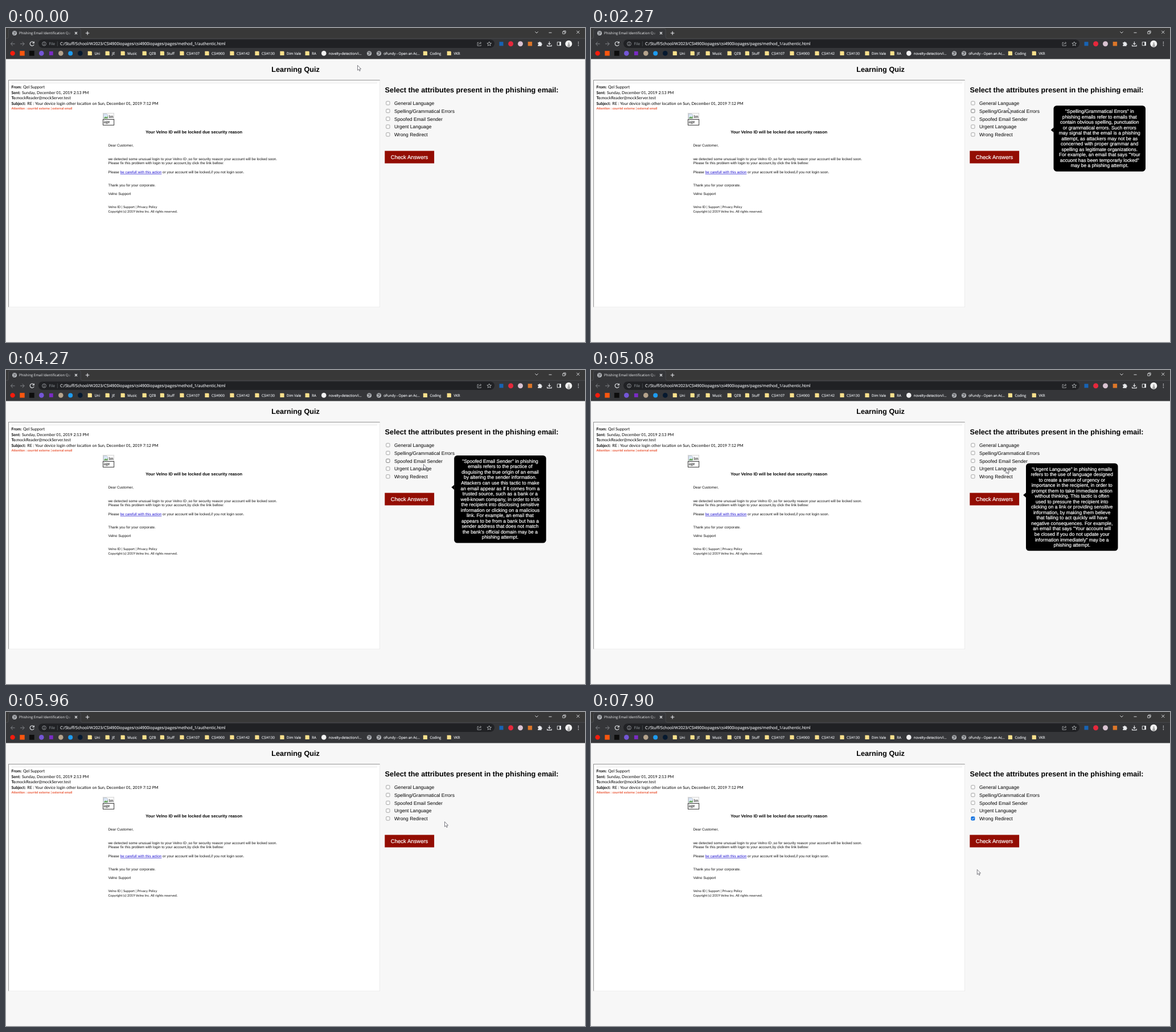
These frames come from a looping animation (1017 px wide and 551 px high, 7990 ms). An HTML page:

```html
<!DOCTYPE html>
<html lang="en">
<head>
<meta charset="utf-8">
<title>Learning Quiz</title>
<style>
html, body { margin: 0; width: 100%; height: 100%; overflow: hidden; background: #f7f7f7; }
svg { display: block; width: 1017px; height: 551px; }
text { white-space: pre; text-rendering: geometricPrecision; }
/* light text on dark reads slightly heavier */
text[fill="#fff"] { stroke: #fff; stroke-width: .2px; }
text[fill="#e8eaed"] { stroke: #e8eaed; stroke-width: .15px; }
.page { font-family: "Liberation Sans", Arial, sans-serif; }
.mail { font-family: Lato, sans-serif; }
.ui { font-family: "Open Sans", "Noto Sans", sans-serif; }
.b { font-weight: 700; }
</style>
</head>
<body>
<svg id="stage" viewBox="0 0 1017 551" xmlns="http://www.w3.org/2000/svg">
  <defs>
    <linearGradient id="fade" gradientUnits="userSpaceOnUse" x1="106" x2="116" y1="0" y2="0">
      <stop offset="0" stop-color="#f1f2f4"/><stop offset="1" stop-color="#f1f2f4" stop-opacity="0"/>
    </linearGradient>
    <g id="globe">
      <circle r="4" fill="#c3c6ca"/>
      <path d="M-3 -1.6Q-1 -2.6 0 -1T2 1.4M-2.6 1.8Q-.6 .4 .3 2.6M.8 -3Q1 -1.4 2.8 -1.2" fill="none" stroke="#4a4b4e" stroke-width="1.1"/>
    </g>
    <path id="folder" d="M-3.6 -3.6H2.6L3.6 -2.6V3.7H-3.6Z" fill="#fbe08c"/>
  </defs>
  <g id="chrome">
    <rect width="1017" height="19" fill="#383838"/>
    <rect y="18" width="1017" height="36.5" fill="#353639"/>
    <path d="M0 18.3H2Q4.5 18.3 4.5 15.5V4Q4.5 .8 7.7 .8H128Q131.2 .8 131.2 4V15.5Q131.2 18.3 134 18.3H1017" fill="#353639" stroke="#57585b" stroke-width=".6"/>
    <rect x="57" y="20.2" width="801" height="14.8" rx="7.4" fill="#202124"/>
    <g fill="none" stroke="#e8eaed" stroke-width=".9">
      <path d="M121 7l4 4M125 7l-4 4M139.8 9h6.6M143.1 5.7v6.6" stroke-width="1.1"/>
      <path d="M929.4 6.4l2.6 2.6 2.6 -2.6M953.5 8.2h5M1002.3 4.8l5 5M1007.3 4.8l-5 5"/>
      <path d="M977.8 6.3h3.9v3.9h-3.9zM979.2 6.2v-1.2h3.9v3.9h-1.3" stroke-width=".8"/>
      <path d="M15.6 27.8H8.6M11.8 24.4L8.4 27.8l3.4 3.4M25 27.8h7M28.8 24.4l3.4 3.4-3.4 3.4" stroke="#8b8d91"/>
      <path d="M48.5 25.3A3.6 3.6 0 1 0 49.2 28.8M49.3 23.8v2.7h-2.8" stroke-width="1.1"/>
      <path d="M67 27.3v2.4M67 25.4v.9" stroke="#bdc1c6"/>
      <circle cx="67" cy="27.7" r="3.4" stroke="#bdc1c6" stroke-width=".7"/>
      <path d="M90.3 23.5v8.5" stroke="#5f6368" stroke-width=".6"/>
      <path d="M830.3 25.4h-2.2v5.8h6.2v-1.8M830 29.2q.4 -3 4 -3M832.8 24.3l2 1.9-2 1.9" stroke="#c4c7cb" stroke-width=".7"/>
      <path d="M848.7 24l1.1 2.5 2.7.2-2.1 1.8.7 2.6-2.4-1.4-2.4 1.4.7-2.6-2.1-1.8 2.7-.2z" stroke="#d5d8dc" stroke-width=".7"/>
      <path d="M954.4 23.8v5M952.2 26.8l2.2 2.2 2.2-2.2M950.6 29.4v2.2h7.6v-2.2" stroke-width="1.1"/>
      <path d="M968.3 24.7h6.2v6h-6.2z"/>
    </g>
    <path d="M972.2 24.5h2.6v6.4h-2.6z" fill="#e8eaed"/>
    <path d="M934.2 25.2h2.1a1.2 1.2 0 0 1 2.4 0h1.9v2.1a1.2 1.2 0 0 1 0 2.4v2h-6.4v-1.9a1.2 1.2 0 0 0 0-2.4z" fill="#e8eaed"/>
    <g fill="#e8eaed"><circle cx="1005.4" cy="24.9" r=".8"/><circle cx="1005.4" cy="27.8" r=".8"/><circle cx="1005.4" cy="30.7" r=".8"/></g>
    <circle cx="988.3" cy="27.7" r="6" fill="#f4f4f4"/>
    <path d="M986.4 33.2q-.5 -4 1.3 -5.2q-1 -2 .5 -3q2 .4 1.3 3q2 1.6 1 5.2z" fill="#a9a9a9"/>
    <use href="#globe" x="15" y="9"/>
  </g>
  <g id="sheet">
    <rect x="4" y="91" width="653" height="399" fill="#ececec"/>
    <path d="M4 490V91H657L656 92.2H5.2V489z" fill="#989898"/>
    <rect x="5.2" y="92.2" width="650.8" height="397" fill="#fff"/>
    <path d="M9.5 96.4H652" stroke="#dcdcdc" stroke-width=".7"/>
    <rect x="170.4" y="149.4" width="19.3" height="11" fill="#f8f8f8" stroke="#c4c4c4" stroke-width=".6"/>
    <path d="M171.3 150.7h5.5l2 2v6h-7.5z" fill="#dbe7f7" stroke="#9aa3ad" stroke-width=".6"/>
    <path d="M171.6 158.4l3-3.2 1.7 1.6 2.2-2v3.6z" fill="#64a353"/>
    <rect x="170.4" y="160.4" width="19.3" height="10" fill="#fff" stroke="#222" stroke-width=".9"/>
    <rect x="665.3" y="215.6" width="86.8" height="21.9" fill="#930d03"/>
  </g>
  <g id="words"></g>
  <g id="rows"></g>
  <g id="tips"></g>
  <path id="cursor" d="M0 0V8.7L2 6.9 3.4 10 4.8 9.4 3.5 6.4H6.1Z" fill="#fff" stroke="#3a3a44" stroke-width=".65"/>
</svg>
<script>
const NS = "http://www.w3.org/2000/svg";
const $ = id => document.getElementById(id);

function add(parent, tag, attrs, content) {
  const el = document.createElementNS(NS, tag);
  for (const key in attrs) el.setAttribute(key, attrs[key]);
  if (content !== undefined) el.textContent = content;
  parent.appendChild(el);
  return el;
}

const words = $("words");
const say = (cls, size, x, y, content, fill = "#000", parent = words) =>
  add(parent, "text", { class: cls, "font-size": size, x, y, fill }, content);

// Browser bar
const LIGHT = "#e8eaed", bar = $("chrome");
say("ui", 6.1, 23, 11.2, "Phishing Email Identification Qu", "url(#fade)");
say("ui", 6.7, 75.5, 30.2, "File", "#9aa0a6");
say("ui", 7.08, 95, 30.2, "C:/Stuff/School/W2023/CSI4900iopages/csi4900iopages/pages/method_1/authentic.html", LIGHT);

const dot = (cx, cy, r, fill) => add(bar, "circle", { cx, cy, r, fill });
const square = (cx, cy, s, fill) => add(bar, "rect", { x: cx - s / 2, y: cy - s / 2, width: s, height: s, fill });
dot(11.6, 44.4, 4.2, "#f61c0d");
square(28.5, 44.4, 8.4, "#f9560f");
square(45.3, 44.4, 8.8, "#0d0d0d");
dot(62.3, 44.4, 4.3, "#7456d6");
square(79.3, 44.4, 6.8, "#7a2bc4");
dot(96.3, 44.4, 4.3, "#b5a38c");
dot(113.2, 44.4, 4, "#1d9bf0");
dot(130.3, 44.4, 4.3, "#06192f");
dot(558.3, 44.4, 4.3, "#f2f2f2");
square(870, 27.8, 7, "#1763b4");
dot(886.6, 27.8, 4.5, "#e5283c");
dot(903.5, 27.8, 4.5, "#d9c3d2");
square(920.4, 27.8, 7.4, "#dc7629");

const folders = [
  [147.3, "Uni"], [178.2, "JE"], [205.2, "Music"], [243.2, "QZB"], [274.4, "Stuff"],
  [309, "CSI4107"], [353, "CSI4900"], [397, "CSI4142"], [441, "CSI4130"],
  [485, "Dim Vale"], [529.2, "RA"], [736.4, "Coding"], [778.3, "VKR"]
];
for (const [x, name] of folders) {
  add(bar, "use", { href: "#folder", x, y: 44.4 });
  say("ui", 6.1, x + 8.1, 46.7, name, LIGHT);
}
for (const x of [638, 655]) add(bar, "use", { href: "#globe", x, y: 44.4 });
say("ui", 6.1, 566.8, 46.7, "novelty-detection/i...", LIGHT);
say("ui", 6.1, 663.2, 46.7, "oFundy - Open an Ac...", LIGHT);

// Page headings
say("page b", 12.71, 508.6, 76.8, "Learning Quiz").setAttribute("text-anchor", "middle");
say("page b", 12.71, 665.6, 113, "Select the attributes present in the phishing email:");
say("page", 9.534, 675.8, 229.6, "Check Answers", "#fff");

// Email
const headers = [
  ["From:", 30, "Qel Support"],
  ["Sent:", 28, "Sunday, December 01, 2019 2:13 PM"],
  ["To:", 18.4, "mockReader@mockServer.test"],
  ["Subject:", 37.2, "RE : Your device login other location on Sun, December 01, 2019 7:12 PM"]
];
headers.forEach(([label, x, value], i) => {
  const y = 106.1 + i * 9.53;
  say("mail b", 7, 9.5, y, label);
  say("mail", 7.15, x, y, value);
});
say("mail b", 5.62, 9.5, 142.5, "Attention : courriel externe | external email", "#e8502e");
say("mail", 7.15, 180.8, 157.6, "Im");
say("mail", 7.15, 171.6, 166.9, "age");
say("page b", 7.415, 245.2, 184.9, "Your Velno ID will be locked due security reason");
const body = [
  [208.4, "Dear Customer,"],
  [231.8, "we detected some unusual login to your Velno ID ,so for security reason your account will be locked soon."],
  [239.2, "Please fix this problem with login to your account,by click the link bellow:"],
  [278.3, "Thank you for your corporate."],
  [293.2, "Velno Support"]
];
for (const [y, line] of body) say("page", 6.356, 179.5, y, line, "#111");
const ask = say("page", 6.356, 179.5, 254.9, "Please ", "#111");
add(ask, "tspan", { fill: "#1a0dd0", "text-decoration": "underline" }, "be carefull with this action");
add(ask, "tspan", {}, " or your account will be locked,if you not login soon.");
say("mail", 5.8, 179.5, 316.4, "Velno ID | Support | Privacy Policy", "#111");
say("mail", 5.8, 179.5, 323.9, "Copyright (c) 2019 Velno Inc. All rights reserved.", "#111");

// Answer rows and their tooltips
const PITCH = 13.77, LINE = 9.534, PAD = 5.3, TIP_W = 161.5;
const answers = [
  ["General Language", 769.6, `"General Language" in phishing
emails refers to vague or non-specific
language used to target a broad
audience, without knowing specific
details about individual recipients. For
example, an email that starts with
"Dear valued customer" or uses vague
language like "Your account has been
compromised" may be a phishing
attempt.`],
  ["Spelling/Grammatical Errors", 812.5, `"Spelling/Grammatical Errors" in
phishing emails refer to emails that
contain obvious spelling, punctuation
or grammatical errors. Such errors
may signal that the email is a phishing
attempt, as attackers may not be as
concerned with proper grammar and
spelling as legitimate organizations.
For example, an email that says "Your
accuont has been temporarly locked"
may be a phishing attempt.`],
  ["Spoofed Email Sender", 787.2, `"Spoofed Email Sender" in phishing
emails refers to the practice of
disguising the true origin of an email
by altering the sender information.
Attackers can use this tactic to make
an email appear as if it comes from a
trusted source, such as a bank or a
well-known company, in order to trick
the recipient into disclosing sensitive
information or clicking on a malicious
link. For example, an email that
appears to be from a bank but has a
sender address that does not match
the bank's official domain may be a
phishing attempt.`],
  ["Urgent Language", 764, `"Urgent Language" in phishing emails
refers to the use of language designed
to create a sense of urgency or
importance in the recipient, in order to
prompt them to take immediate action
without thinking. This tactic is often
used to pressure the recipient into
clicking on a link or providing sensitive
information, by making them believe
that failing to act quickly will have
negative consequences. For example,
an email that says "Your account will
be closed if you do not update your
information immediately" may be a
phishing attempt.`],
  ["Wrong Redirect", 756.5, `"Wrong Redirect" in phishing emails
refers to the use of links that lead to
a different website than the one the
recipient expects to visit. Attackers
can use this tactic to send people to
a fake login page, in order to steal
their passwords or other sensitive
information. For example, an email
that asks you to log in to your bank
account but has a link that leads to
an unrelated website, or to a domain
that does not match the official
domain of the bank, may be a
phishing attempt.`]
];

const boxes = [], tips = [];
answers.forEach(([label, x, note], i) => {
  const rowY = i * PITCH;
  boxes.push(add($("rows"), "rect", { x: 667.8, y: 128.7 + rowY, width: 6.2, height: 6.2, rx: 1.2, "stroke-width": .7 }));
  say("page", 8.475, 682, 135.1 + rowY, label, "#000", $("rows"));

  const tip = add($("tips"), "g", {}), lines = note.split("\n");
  const top = 122.4 + rowY, height = lines.length * LINE + 2 * PAD;
  const tipY = top + height * .344 + 3;
  add(tip, "rect", { x, y: top, width: TIP_W, height, rx: 5.3 });
  add(tip, "path", { d: `M${x + .2} ${tipY - 4.4}l-5 4.4 5 4.4z` });
  lines.forEach((line, n) =>
    say("page", 8.475, x + TIP_W / 2, top + PAD + 7.6 + n * LINE, line, "#fff", tip).setAttribute("text-anchor", "middle"));
  tips.push(tip);
});
const tick = add($("rows"), "path", { d: "M669.2 187l1.3 1.4 2.4-3", fill: "none", stroke: "#fff", "stroke-width": 1 });

// Pointer path: time, x, y
const LOOP = 7990, CHECK_AT = 7040;
const path = [
  [0, 617.5, 65.5], [90, 617.5, 65.5], [690, 736, 100.5], [930, 735.5, 108], [1240, 734.3, 127.5],
  [1330, 734.5, 129], [1570, 734.5, 129], [1950, 735, 135.3], [2190, 735, 135.3], [2270, 733, 140.5],
  [2430, 733, 142], [2930, 733, 142], [3540, 733.5, 159], [3790, 733.5, 159], [3880, 733.5, 160],
  [4030, 733.5, 160], [4270, 733.5, 165.5], [4500, 733, 170], [5000, 733, 170], [5080, 729, 172.5],
  [5470, 727, 183], [5860, 727, 183], [5960, 770.5, 192.5], [6270, 776, 199], [6590, 776, 199],
  [6900, 671, 187], [7150, 671, 187], [7360, 685, 202], [7440, 685, 202], [7750, 679, 284],
  [7899, 679, 284], [7900, 678.3, 276.5], [LOOP, 678.3, 276.5]
];
// Hovered row from a given time, -1 for none
const hovers = [[0, -1], [1160, 0], [2200, 1], [3200, 2], [4360, 3], [5230, 4], [5890, -1], [6740, 4], [7260, -1]];

function pointerAt(t) {
  const i = path.findIndex(p => p[0] > t);
  const [t0, x0, y0] = path[i - 1], [t1, x1, y1] = path[i];
  const k = (t - t0) / (t1 - t0);
  return [x0 + (x1 - x0) * k, y0 + (y1 - y0) * k];
}

function draw(t) {
  const row = hovers.filter(h => h[0] <= t).pop()[1];
  const checked = t >= CHECK_AT;
  tips.forEach((tip, i) => tip.setAttribute("display", i === row ? "inline" : "none"));
  boxes.forEach((box, i) => {
    const on = checked && i === 4;
    box.setAttribute("fill", on ? "#0b6fe0" : "#fff");
    box.setAttribute("stroke", on ? "#0b6fe0" : i === row ? "#4a4a4a" : "#7d7d7d");
  });
  tick.setAttribute("display", checked ? "inline" : "none");
  $("cursor").setAttribute("transform", `translate(${pointerAt(t)})`);
}

const start = performance.now();
function frame() {
  draw((performance.now() - start) % LOOP);
  requestAnimationFrame(frame);
}
frame();
</script>
</body>
</html>
```
